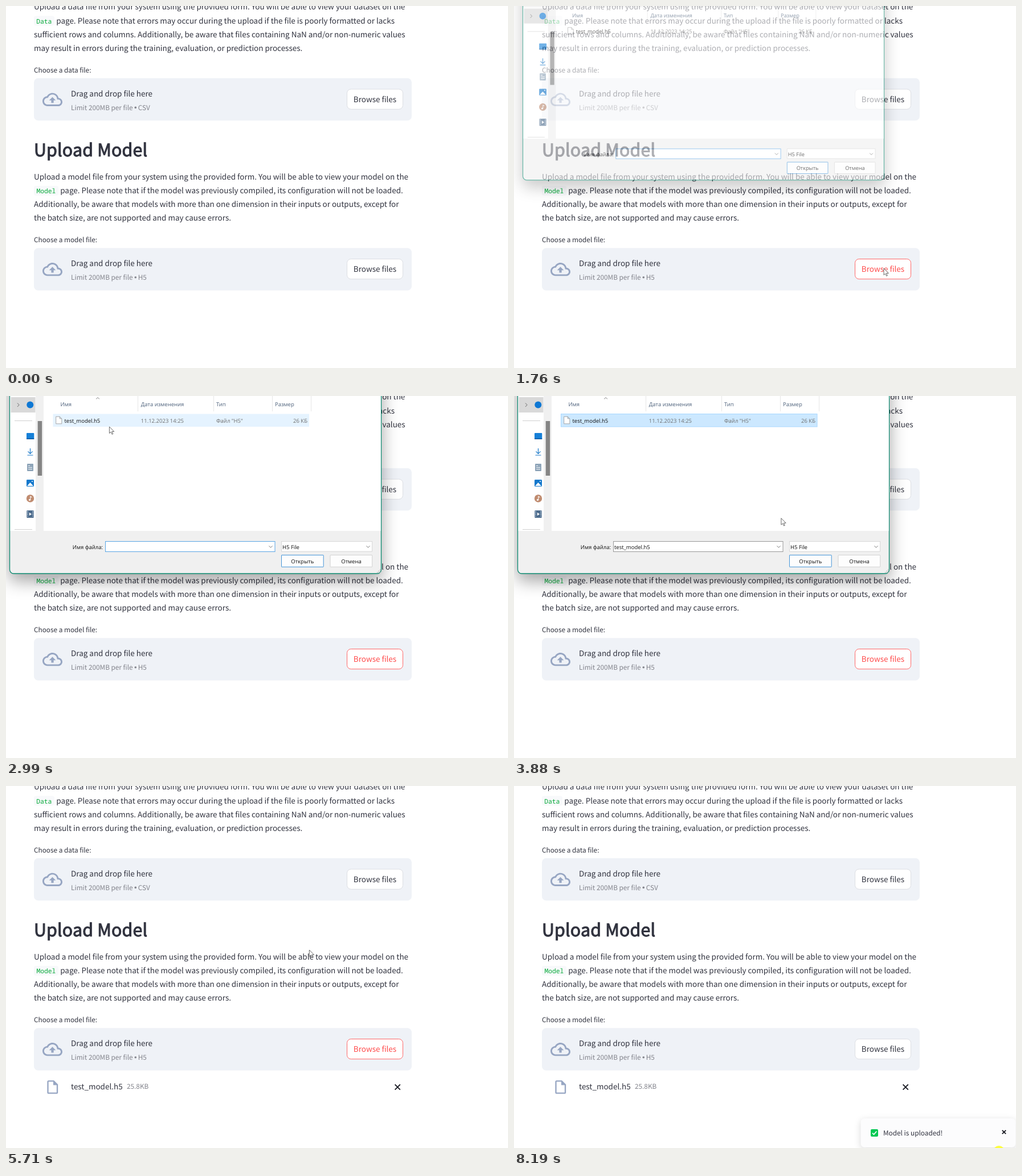
An HTML page for the animation above (8.25 s loop, 881 by 636 pixels).

```html
<!DOCTYPE html>
<html lang="en">
<head>
<meta charset="utf-8">
<title>Model upload</title>
<style>
html, body { margin: 0; width: 100%; height: 100%; overflow: hidden; background: #fff; }
svg { display: block; width: 881px; height: 636px; }
text {
  font: 13.48px "Noto Sans CJK SC", "Noto Sans CJK JP", "Noto Sans CJK KR", "Noto Sans CJK TC", "Noto Sans", sans-serif;
  fill: #31333f; text-rendering: geometricPrecision;
}
.small { font-size: 11.8px; }
.dim { fill: #83848c; }
.code { font: 11.3px "Noto Sans Mono", "DejaVu Sans Mono", monospace; fill: #09ab3b; }
.title { font-size: 30.3px; letter-spacing: .2px; stroke: #31333f; stroke-width: 1.1px; }
.mid { text-anchor: middle; }
.end { text-anchor: end; }
.face { fill: var(--bg, #fff); stroke: var(--line, #dcdee3); }
.word { fill: var(--fg, #31333f); }
#dialog text { font: 9.5px "Open Sans", "Noto Sans", sans-serif; fill: #111; }
#dialog .head { fill: #4c607a; }
#dialog .meta { fill: #6d6d6d; }
#dialog { transform-origin: 332px 90px; }
#frame { filter: drop-shadow(0 12px 15px rgba(0,0,0,.36)); }
#card { filter: drop-shadow(0 3px 6px rgba(0,0,0,.15)); }
.line { fill: none; stroke: #666; }
</style>
</head>
<body>
<svg viewBox="0 0 881 636">
  <defs>
    <g id="zone">
      <rect x="49" width="663" height="74.5" rx="7.5" fill="#eff2f7"/>
      <path transform="translate(64 20) scale(1.458)" fill="#97a6c3" d="M19.35 10.04C18.67 6.59 15.64 4 12 4 9.11 4 6.6 5.64 5.35 8.04 2.34 8.36 0 10.91 0 14c0 3.31 2.69 6 6 6h13c2.76 0 5-2.24 5-5 0-2.64-2.05-4.78-4.65-4.96zM19 18H6c-2.21 0-4-1.79-4-4 0-2.05 1.53-3.76 3.56-3.97l1.07-.11.5-.95C8.08 7.14 9.94 6 12 6c2.62 0 4.88 1.86 5.39 4.43l.3 1.5 1.53.11c1.56.1 2.78 1.41 2.78 2.96 0 1.65-1.35 3-3 3zM8 13h2.55v3h2.9v-3H16l-4-4z"/>
      <text x="114" y="32.3">Drag and drop file here</text>
      <text x="114" y="55.8" class="small dim">Limit 200MB per file</text>
      <circle cx="227.3" cy="51.6" r="1.8" fill="#83848c"/>
    </g>
    <g id="browse">
      <rect class="face" x="598.5" y="19.3" width="98" height="35.2" rx="7"/>
      <text class="word mid" x="647.5" y="42.3">Browse files</text>
    </g>
    <path id="cross" d="M-1-1 1 1M1-1-1 1" stroke="#15171f" vector-effect="non-scaling-stroke" stroke-width="1.8"/>
  </defs>

  <text x="49" y="6.4">Upload a data file from your system using the provided form. You will be able to view your dataset on the</text>
  <rect x="49" y="17.5" width="36" height="17" rx="3.5" fill="#f8f9fb"/>
  <text x="53.2" y="30.7" class="code">Data</text>
  <text x="88.3" y="30.5">page. Please note that errors may occur during the upload if the file is poorly formatted or lacks</text>
  <text x="49" y="54.5">sufficient rows and columns. Additionally, be aware that files containing NaN and/or non-numeric values</text>
  <text x="49" y="78.6">may result in errors during the training, evaluation, or prediction processes.</text>
  <text x="49" y="116.6" class="small">Choose a data file:</text>
  <g transform="translate(0 126.8)">
    <use href="#zone"/><use href="#browse"/>
    <text x="231.7" y="55.8" class="small dim">CSV</text>
  </g>

  <text x="49" y="264" class="title">Upload Model</text>
  <text x="49" y="304.5">Upload a model file from your system using the provided form. You will be able to view your model on the</text>
  <rect x="49" y="316" width="43" height="17" rx="3.5" fill="#f8f9fb"/>
  <text x="53.4" y="328.9" class="code">Model</text>
  <text x="95.2" y="328.6">page. Please note that if the model was previously compiled, its configuration will not be loaded.</text>
  <text x="49" y="352.7">Additionally, be aware that models with more than one dimension in their inputs or outputs, except for</text>
  <text x="49" y="376.8">the batch size, are not supported and may cause errors.</text>
  <text x="49" y="414.7" class="small">Choose a model file:</text>
  <g transform="translate(0 425.2)">
    <use href="#zone"/><use href="#browse" id="pick"/>
    <text x="231.7" y="55.8" class="small dim">H5</text>
  </g>

  <g id="uploaded">
    <path transform="translate(67.6 514.8) scale(1.18)" fill="#97a6c3" d="M14 2H6c-1.1 0-1.99.9-1.99 2L4 20c0 1.1.89 2 1.99 2H18c1.1 0 2-.9 2-2V8l-6-6zM6 20V4h7v5h5v11H6z"/>
    <text x="114" y="532.8">test_model.h5</text>
    <text x="212" y="532.4" class="small dim">25.8KB</text>
    <use href="#cross" transform="translate(687.2 529) scale(4.6)"/>
  </g>

  <g id="toast">
    <rect id="card" x="608.5" y="584" width="272" height="51" rx="7" fill="#fcfcfd"/>
    <rect x="626" y="603" width="13" height="13" rx="2" fill="#00c853"/>
    <path d="M629 609.7l2.5 2.6 4.8-5.6" fill="none" stroke="#fff" stroke-width="1.7"/>
    <text x="648" y="614" class="small">Model is uploaded!</text>
    <use href="#cross" transform="translate(860 608) scale(3.2)"/>
  </g>

  <g id="dialog">
    <rect id="frame" x="6.5" y="-160" width="652" height="472" rx="7" fill="#f0f0f0" stroke-width="1.3"/>
    <path d="M7.5 0H52V237H7.5zM66 0H657.8V237H66z" fill="#fff"/>
    <rect x="8.5" y="2" width="43" height="27" fill="#d9d9d9"/>
    <path d="M20 12.5l3 3.2-3 3.2" class="line"/>
    <circle cx="42.3" cy="15.6" r="6" fill="#0f78d4"/>
    <path d="M15 43.5H46M15 234.5H46" stroke="#d0d0d0"/>
    <rect x="55.7" y="44" width="7.5" height="96" fill="#858585"/>

    <rect x="36" y="65" width="13.3" height="11" rx="1" fill="#1680d8"/>
    <path d="M36 75.3H49.3" stroke="#0a559c" stroke-width="1.4"/>
    <path d="M42.5 92V101M38.5 97.4l4 4 4-4M37.5 104H47.5" fill="none" stroke="#1a78c8" stroke-width="1.2"/>
    <rect x="37" y="119" width="11" height="13" rx="1" fill="#8fa5b9"/>
    <path d="M39 122.5h3M39 125.5h7M39 128.5h7" stroke="#f3f6f9" stroke-width="1.2"/>
    <rect x="36" y="147" width="13" height="12" rx="1.2" fill="#1478cc"/>
    <path d="M37 158l5.4-6 5.6 6z" fill="#fff"/>
    <circle cx="46" cy="150" r="1" fill="#fff"/>
    <circle cx="42.5" cy="180" r="6.7" fill="#c08c70"/>
    <path d="M42.8 182.5V176.5l2.6 1.4" fill="none" stroke="#fff" stroke-width="1.1"/>
    <circle cx="41.5" cy="182.5" r="1.6" fill="#fff"/>
    <rect x="36.3" y="201" width="12.4" height="13" rx="1" fill="#4c6b8c"/>
    <path d="M38 202V213M47 202V213" stroke="#d5e2ee" stroke-width="1.3" stroke-dasharray="1.4 1.4"/>
    <path d="M40.8 204.7v5.6l4.3-2.8z" fill="#fff"/>

    <path d="M231.5 0V27M364.5 0V27M467.5 0V27M535.5 0V27" stroke="#e6e6e6"/>
    <path d="M158 5.3l3-2.6 3 2.6" class="line" stroke-width=".8"/>
    <text x="95.5" y="18" class="head">Имя</text>
    <text x="236.8" y="18" class="head">Дата изменения</text>
    <text x="369" y="18" class="head">Тип</text>
    <text x="472" y="18" class="head">Размер</text>
    <rect id="row" x="82.5" y="31.5" width="449.5" height="22.5"/>
    <path d="M87.7 36.2h6.5l3.6 3.6v9h-10.1zM94.2 36.2v3.6h3.6" fill="#fff" stroke="#949494" stroke-width=".8"/>
    <text x="102.5" y="46.6">test_model.h5</text>
    <text x="236.8" y="46.6" class="meta">11.12.2023 14:25</text>
    <text x="369" y="46.6" class="meta">Файл "H5"</text>
    <text x="529" y="46.6" class="meta end">26 КБ</text>

    <text x="170" y="268.6" class="end">Имя файла:</text>
    <rect id="field" x="174.5" y="255.5" width="297.5" height="18" fill="#fff"/>
    <text id="name" x="176" y="268.6">test_model.h5</text>
    <rect id="type" x="483.5" y="255.5" width="159" height="17.5" fill="#fff" stroke="#000"/>
    <text x="485" y="268.6">H5 File</text>
    <path d="M461.5 263.3l3 3 3-3M632.5 263.3l3 3 3-3" class="line" stroke-width=".9"/>
    <rect id="open" x="483.5" y="279.5" width="73.7" height="20.8" rx=".5"/>
    <text x="520.3" y="293.9" class="mid">Открыть</text>
    <rect x="569" y="279.5" width="73.7" height="20.8" rx=".5" fill="#fdfdfd" stroke="#d2d2d2"/>
    <text x="606" y="293.9" class="mid">Отмена</text>
    <path d="M651 310h6M653.5 307.5h4M656 305h1.5" stroke="#b5b5b5" stroke-width="1.4" stroke-dasharray="1.4 1.1"/>
  </g>

  <circle id="halo" r="10" fill="#ff0" opacity=".75"/>
  <circle id="busy" cx="659.5" cy="460.5" r="4.3" fill="none" stroke="#2b8fd6" stroke-width="1.8" stroke-dasharray="20 7"/>
  <path id="arrow" d="M0 0V11.6L2.7 9.2 4.6 13.4 6.4 12.6 4.5 8.5H8.3z" fill="#fff" stroke="#444" stroke-width=".8"/>
</svg>
<script>
const LOOP = 8250;
const $ = id => document.getElementById(id);
const clamp = v => Math.max(0, Math.min(1, v));
const ramp = (t, a, b) => clamp((t - a) / (b - a));
const within = (t, a, b) => t >= a && t < b;
const show = (id, on) => $(id).style.display = on ? "" : "none";
const paint = (id, fill, stroke) => {
  $(id).setAttribute("fill", fill);
  $(id).setAttribute("stroke", stroke);
};

// pointer stops: time, x, y
const stops = [
  [70, 816, 614], [890, 649, 461], [2310, 649, 461], [3060, 170, 44],
  [3200, 170, 44], [4120, 529, 249], [4360, 532.3, 288], [6310, 532.3, 288],
  [7200, 780, 533], [7800, 851, 642], [LOOP, 851, 642]
];
// mouse presses: from, to
const presses = [[940, 1070], [3050, 3270], [5220, 5290], [8120, LOOP]];

function pointer(t) {
  const i = Math.max(1, stops.findIndex(s => s[0] > t));
  const [t0, x0, y0] = stops[i - 1], [t1, x1, y1] = stops[i];
  const p = ramp(t, t0, t1), e = p * p * (3 - 2 * p);
  return [x0 + (x1 - x0) * e, y0 + (y1 - y0) * e];
}

function draw(t) {
  const [x, y] = pointer(t);
  const place = `translate(${x} ${y})`;
  $("arrow").setAttribute("transform", place);
  $("halo").setAttribute("transform", place);
  show("arrow", t >= 70);
  show("halo", presses.some(p => within(t, ...p)));
  show("busy", within(t, 1210, 1470));
  $("busy").setAttribute("transform", `rotate(${t * 0.7} 659.5 460.5)`);

  const pressed = within(t, 940, 1070);
  const hot = t < 940 ? x < 697 && y < 480 : t < 8120;
  const pick = $("pick").style;
  pick.setProperty("--bg", pressed ? "#ff4b4b" : "#fff");
  pick.setProperty("--line", hot ? "#ff6868" : "#dcdee3");
  pick.setProperty("--fg", pressed ? "#fff" : hot ? "#ff4b4b" : "#31333f");

  const seen = ramp(t, 1610, 1860) * (1 - ramp(t, 5480, 5700));
  show("dialog", seen > 0);
  $("dialog").style.opacity = seen;
  $("dialog").style.transform = `scale(${0.93 + 0.07 * seen})`;
  $("frame").setAttribute("stroke", t < 5290 ? "#0b8a70" : "#a5a5a5");

  const chosen = t >= 3050;
  const hover = y < 54 && x < 532;
  if (t >= 5220) paint("row", "#d9d9d9", "#d9d9d9");
  else if (chosen) paint("row", "#cce8ff", "#a8d8ff");
  else paint("row", hover ? "#e5f3ff" : "none", "none");
  paint("field", "#fff", chosen ? "#989898" : "#5aa5e4");
  show("name", chosen);

  const glow = ramp(t, 4030, 4120) * (1 - ramp(t, 4200, 4750));
  $("type").setAttribute("stroke-opacity", 0.13 + 0.35 * glow);
  const opening = within(t, 5220, 5290);
  paint("open", opening ? "#cce4f7" : t >= 4290 ? "#e5f1fb" : "#fdfdfd", opening ? "#1a669f" : "#4595d8");

  show("uploaded", t >= 5640);
  show("toast", t >= 5860);
  $("toast").style.opacity = ramp(t, 5860, 6050);
}

const start = performance.now();
function tick() {
  draw((performance.now() - start) % LOOP);
  requestAnimationFrame(tick);
}
tick();
</script>
</body>
</html>
```
